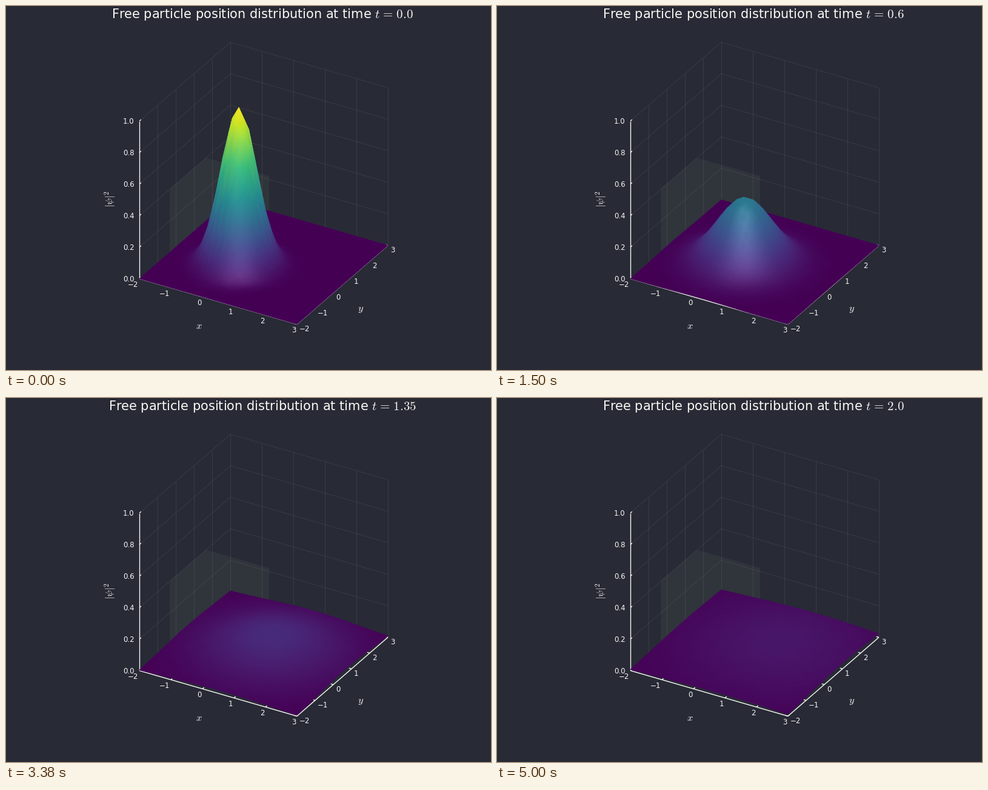
Animation of 800 by 600 pixels, one loop 5120 ms. Source, as a matplotlib script:

```python
import numpy as np
import matplotlib.pyplot as plt
from matplotlib.animation import FuncAnimation
from matplotlib.collections import LineCollection, TriMesh
from matplotlib.tri import Triangulation

plt.rcParams.update({"font.family": "DejaVu Sans", "mathtext.fontset": "cm"})

BG, WALL, FG = "#282a36", "#30343b", "#f8f8f2"
PX = 0.72                      # one pixel in points at 100 dpi
LO, HI = -2, 3
FRAMES, LOOP_MS, DT = 41, 5120, 0.05
VX, VY = 0.5, 0.5
SCALE = 300
C30, S30 = np.cos(np.pi / 6), 0.5


def project(x, y, z):
    """Orthographic view, azimuth and elevation both 30 degrees."""
    u, v = (x - LO) / (HI - LO), (y - LO) / (HI - LO)
    px = 220.1 + SCALE * (C30 * u + S30 * v)
    py = 449.4 + SCALE * (S30 * S30 * u - C30 * S30 * v - C30 * z)
    return px, py


def segment(a, b):
    return [project(*a), project(*b)]


def density(x, y, t):
    s = 1 + 4 * t * t
    return np.exp(-2 * ((x - VX * t) ** 2 + (y - VY * t) ** 2) / s) / s


fig = plt.figure(figsize=(8, 6), dpi=100, facecolor=BG)
ax = fig.add_axes([0, 0, 1, 1])
ax.set_xlim(0, 800)
ax.set_ylim(600, 0)
ax.axis("off")

# small tinted box behind the surface
x1, y0, y1, z1 = 0, LO + 5 / 3, LO + 11 / 3, 0.4
hexagon = [(LO, y0, 0), (LO, y0, z1), (LO, y1, z1),
           (x1, y1, z1), (x1, y1, 0), (x1, y0, 0)]
ax.fill(*zip(*[project(*p) for p in hexagon]), color=WALL, lw=0, zorder=0)

# grid on the two back walls
ticks = np.arange(LO, HI + 1)
levels = np.linspace(0, 1, 6)
grid = [segment((LO, y, 0), (LO, y, 1)) for y in ticks[1:]]
grid += [segment((x, HI, 0), (x, HI, 1)) for x in ticks[1:]]
grid += [segment((LO, LO, z), (LO, HI, z)) for z in levels]
grid += [segment((LO, HI, z), (HI, HI, z)) for z in levels]
ax.add_collection(LineCollection(grid, colors=FG, alpha=0.08,
                                 linewidths=PX, zorder=1), autolim=False)

# axes with inward ticks
origin = (LO, LO, 0)
axes = [segment(origin, (HI, LO, 0)),
        segment((HI, LO, 0), (HI, HI, 0)),
        segment(origin, (LO, LO, 1))]
marks = [segment((x, LO, 0), (x, LO + 0.09, 0)) for x in ticks]
marks += [segment((HI, y, 0), (HI - 0.08, y, 0)) for y in ticks]
marks += [segment((LO, LO, z), (LO, LO + 0.09, z)) for z in levels]
ax.add_collection(LineCollection(axes + marks, colors=FG,
                                 linewidths=1.4 * PX, zorder=2), autolim=False)


def label(pos, dx, dy, text, ha):
    px, py = project(*pos)
    ax.text(px + dx, py + dy, text, color=FG, fontsize=8.5,
            ha=ha, va="baseline", zorder=4)


for k in ticks:
    name = str(k).replace("-", "\u2212")
    label((k, LO, 0), -1.6, 13.6, name, "right")
    label((HI, k, 0), 4.2, 11.2, name, "left")
for z in levels:
    label((LO, LO, z), -8.4, 4.4, f"{z:.1f}", "right")

guide = dict(color=FG, fontsize=11.8, va="baseline", zorder=4)
ax.text(318.5, 531.5, "$x$", ha="center", **guide)
ax.text(585, 502.5, "$y$", ha="center", **guide)
ax.text(177, 332.5, r"$|\psi|^2$", ha="left", rotation=90,
        rotation_mode="anchor", **guide)
title = ax.text(423, 20.4, "", color=FG, fontsize=15,
                ha="center", va="baseline", zorder=4)

# surface mesh, cells ordered from back to front
N = 26
nodes = np.linspace(LO, HI, N)
X, Y = np.meshgrid(nodes, nodes)
tris = []
for j in range(N - 2, -1, -1):
    for i in range(N - 1):
        a = j * N + i
        b, c, d = a + 1, a + N, a + N + 1
        tris += [(a, c, d), (a, d, b)]
flat = project(X.ravel(), Y.ravel(), 0)
mesh = Triangulation(*flat, triangles=tris)
surface = TriMesh(mesh, zorder=3)
ax.add_collection(surface, autolim=False)

viridis = plt.get_cmap("viridis")
tilt = np.radians(56)
SHINE = np.sin(tilt) * S30, -np.sin(tilt) * C30, np.cos(tilt)


def shade(z):
    """Height colours plus a soft highlight on slopes facing the viewer."""
    gy, gx = np.gradient(z * (HI - LO), nodes, nodes)
    facing = (-gx * SHINE[0] - gy * SHINE[1] + SHINE[2]) / np.sqrt(1 + gx**2 + gy**2)
    rgba = viridis(z.ravel())
    gloss = 0.13 * np.clip(facing, 0, 1).ravel() ** 12
    rgba[:, :3] = np.clip(rgba[:, :3] + gloss[:, None], 0, 1)
    return rgba


def update(k):
    t = round(k * DT, 2)
    z = density(X, Y, t)
    mesh.x, mesh.y = project(X.ravel(), Y.ravel(), z.ravel())
    surface.set_facecolor(shade(z))
    title.set_text("Free particle position distribution at time "
                   rf"$t\hspace{{0.115}}=\hspace{{0.115}}{t}$")
    return surface, title


anim = FuncAnimation(fig, update, frames=FRAMES, interval=LOOP_MS / FRAMES,
                     repeat=True, repeat_delay=0, blit=False)
plt.show()
```
